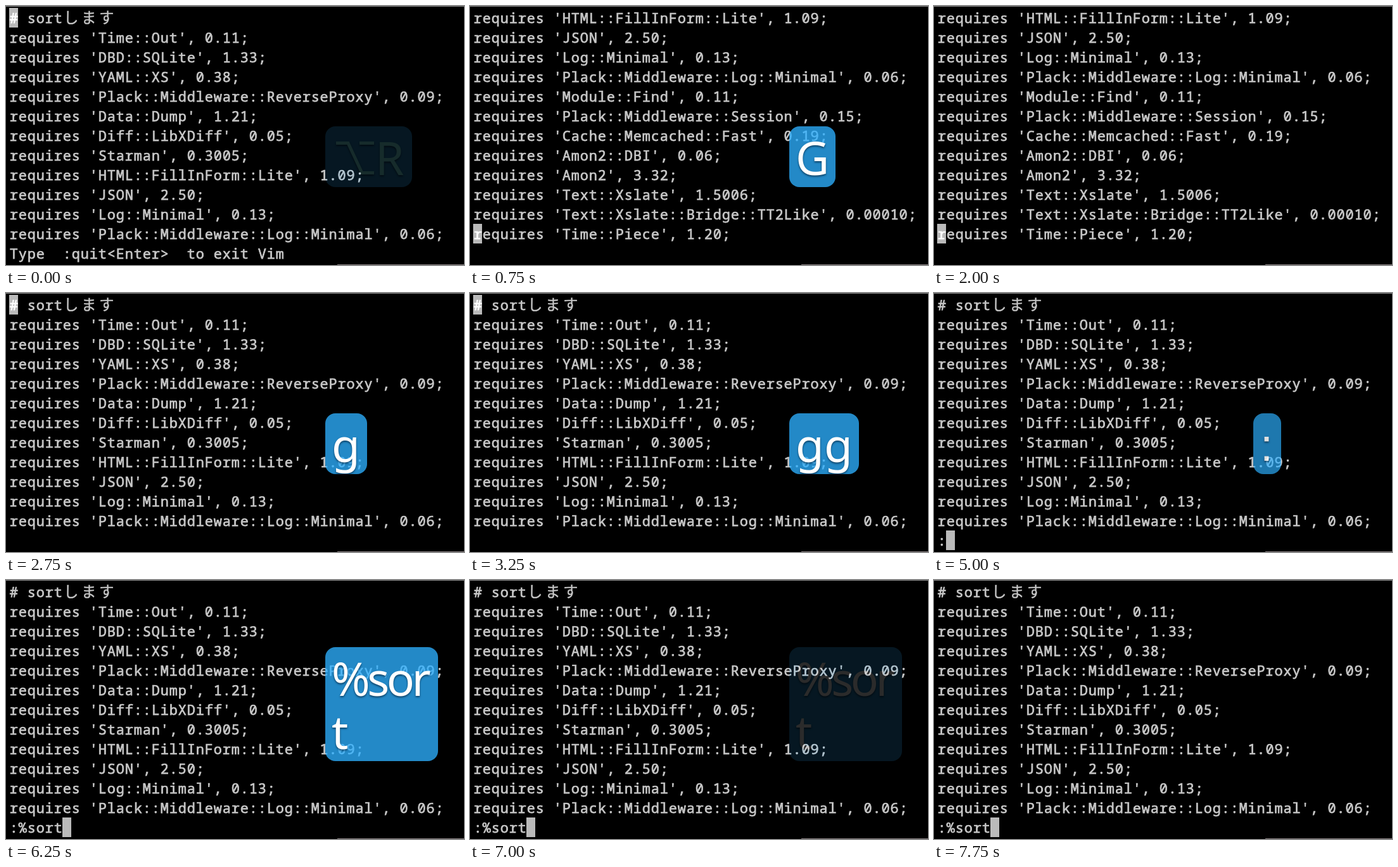
These frames come from a looping animation (723 by 409 pixels, 8000 ms). An HTML page:

```html
<!DOCTYPE html>
<html lang="ja">
<head>
<meta charset="utf-8">
<title>Vim sort</title>
<style>
  html, body { margin: 0; width: 100%; height: 100%; overflow: hidden; background: #000; }
  svg { display: block; width: 723px; height: 409px; }
  text { white-space: pre; }
  .term { font: 500 21.8px "Noto Sans Mono", monospace; letter-spacing: .92px; fill: #c8c8c8; }
  .term text { stroke: #c8c8c8; stroke-width: .75px; }
  .term .kana { font: 400 23.4px "Noto Sans CJK JP", "Noto Sans CJK", sans-serif; letter-spacing: 4.6px; stroke-width: .4px; }
  .block { fill: #bababa; }
  .term .under { fill: #fff; stroke: #fff; }
  .glyphs { font: 400 73px "Noto Sans", sans-serif; fill: #fff; filter: drop-shadow(0 2px 1.5px rgba(0, 20, 40, .6)); }
  .glyphs .wide { letter-spacing: -4.4px; }
  .glyphs .colon { font: 400 72px "Liberation Sans", sans-serif; transform: translate(1px, -2px); }
</style>
</head>
<body>
<svg id="stage" viewBox="0 0 723 409">
  <rect width="723" height="409"/>
  <rect width="723" height="1" fill="#8c8c8c"/>
  <rect x="523" y="408" width="200" height="1" fill="#8a8284"/>
</svg>
<script>
const LOOP = 8000, X0 = 5, CELL = 14, ROW = 31, VISIBLE = 12;
const stage = document.getElementById('stage');

const modules = `Time::Out 0.11
DBD::SQLite 1.33
YAML::XS 0.38
Plack::Middleware::ReverseProxy 0.09
Data::Dump 1.21
Diff::LibXDiff 0.05
Starman 0.3005
HTML::FillInForm::Lite 1.09
JSON 2.50
Log::Minimal 0.13
Plack::Middleware::Log::Minimal 0.06
Module::Find 0.11
Plack::Middleware::Session 0.15
Cache::Memcached::Fast 0.19
Amon2::DBI 0.06
Amon2 3.32
Text::Xslate 1.5006
Text::Xslate::Bridge::TT2Like 0.00010
Time::Piece 1.20`;
const file = ['# sort', ...modules.split('\n').map(m => {
  const [name, version] = m.split(' ');
  return `requires '${name}', ${version};`;
})];

function add(parent, tag, attrs = {}, content = '') {
  const el = document.createElementNS('http://www.w3.org/2000/svg', tag);
  for (const k in attrs) el.setAttribute(k, attrs[k]);
  el.textContent = content;
  return parent.appendChild(el);
}
const show = (el, on) => { el.style.display = on ? '' : 'none'; };
const baseline = row => 27 + ROW * row;
const textX = X0 + .7;

function page(first) {
  const g = add(stage, 'g', { class: 'term' });
  file.slice(first, first + VISIBLE).forEach((line, i) =>
    add(g, 'text', { x: textX, y: baseline(i) }, line));
  if (!first) add(g, 'text', { class: 'kana', x: 91, y: baseline(0) }, 'します');
  return g;
}
const pages = { top: page(0), end: page(file.length - VISIBLE) };

const term = add(stage, 'g', { class: 'term' });
const prompt = add(term, 'text', { x: textX, y: baseline(VISIBLE) });
const block = add(term, 'rect', { class: 'block', width: CELL, height: ROW });
const under = add(term, 'text', { class: 'under', x: textX });

function badge(lines, width, cls = '') {
  const g = add(stage, 'g');
  const height = 12 + 84 * lines.length;
  add(g, 'rect', { x: 504, y: 286 - height, width, height, rx: 16, fill: 'rgb(45,176,255)', 'fill-opacity': .78 });
  const glyphs = add(g, 'g', { class: 'glyphs' });
  lines.forEach((s, i) =>
    add(glyphs, 'text', { class: cls, x: 514, y: 267 - 84 * (lines.length - 1 - i) }, s));
  return g;
}

function optionBadge() {
  const tint = '#80ffff';
  const g = badge(['  R'], 137);
  const glyphs = g.lastChild;
  glyphs.style.fill = tint;
  glyphs.firstChild.textContent = 'R';
  glyphs.firstChild.setAttribute('x', 583);
  add(glyphs, 'path', { d: 'M521 216.5H540L562 263.5H581M558 216.5H581', fill: 'none', stroke: tint, 'stroke-width': 5 });
  return g;
}

const badges = {
  option: optionBadge(),
  G: badge(['G'], 73),
  g: badge(['g'], 66),
  gg: badge(['gg'], 110),
  colon: badge([':'], 44, 'colon'),
  '%': badge(['%'], 78, 'wide'),
  '%so': badge(['%so'], 151, 'wide'),
  '%sort': badge(['%sor', 't'], 178, 'wide'),
};

// start, page, bottom line, key badge, badge opacity
const steps = [
  [0, 'top', 'Type  :quit<Enter>  to exit Vim', 'option', .17],
  [250, 'top', 'Type  :quit<Enter>  to exit Vim', '', 0],
  [500, 'end', '', 'G', 1],
  [1250, 'end', '', 'G', .88],
  [1500, 'end', '', 'G', .17],
  [1750, 'end', '', '', 0],
  [2750, 'top', '', 'g', 1],
  [3000, 'top', '', 'gg', 1],
  [3750, 'top', '', 'gg', .88],
  [4000, 'top', '', 'gg', .17],
  [4250, 'top', ':', 'colon', 1],
  [5000, 'top', ':', 'colon', .88],
  [5250, 'top', ':', 'colon', .17],
  [5500, 'top', ':%', '%', 1],
  [5750, 'top', ':%so', '%so', 1],
  [6000, 'top', ':%sort', '%sort', 1],
  [6750, 'top', ':%sort', '%sort', .88],
  [7000, 'top', ':%sort', '%sort', .17],
  [7250, 'top', ':%sort', '', 0],
];

function draw([, view, line, key, opacity]) {
  for (const k in pages) show(pages[k], k === view);
  for (const k in badges) show(badges[k], k === key);
  if (key) badges[key].style.opacity = opacity;

  const typing = line.startsWith(':');
  const row = typing ? VISIBLE : view === 'top' ? 0 : VISIBLE - 1;
  prompt.textContent = line;
  block.setAttribute('x', X0 + (typing ? line.length * CELL : 0));
  block.setAttribute('y', 3 + ROW * row);
  under.setAttribute('y', baseline(row));
  under.textContent = typing ? '' : view === 'top' ? '#' : 'r';
}

let current;
const start = performance.now();
function tick() {
  const t = (performance.now() - start) % LOOP;
  const step = steps.findLast(s => s[0] <= t);
  if (step !== current) draw(current = step);
  requestAnimationFrame(tick);
}
tick();
</script>
</body>
</html>
```
